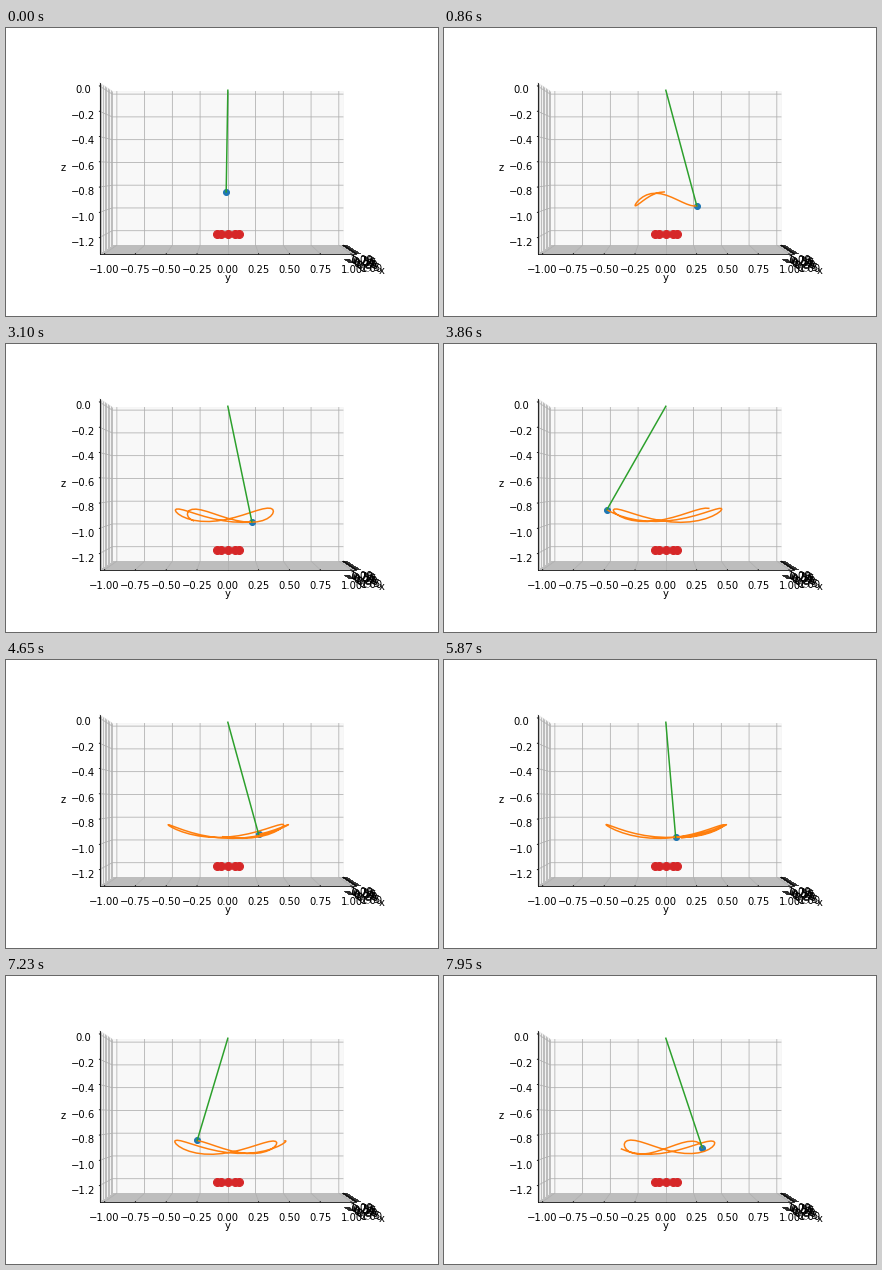
These frames come from a looping animation (432x288 px, 7.99 s). A matplotlib script:

```python
import numpy as np
import matplotlib.pyplot as plt
from matplotlib.animation import FuncAnimation

W, H, DPI = 432, 288, 72
LOOP, FRAMES = 7990, 243

# Swing: a slowly turning ellipse on a sphere of radius 1
MAJOR, MINOR = 0.52, 0.26
HALF_SWING = 16.92              # frames from one turning point to the next
START, TURN = np.radians([-1.6, 11.2])      # first angle, turn per half swing
TRAIL = 50


def position(frame):
    swings = frame / HALF_SWING
    tau = np.pi * swings
    turn = START + TURN * swings
    along, across = MAJOR * np.cos(tau), MINOR * np.sin(tau)
    x = -(along * np.cos(turn) + across * np.sin(turn))
    y = along * np.sin(turn) - across * np.cos(turn)
    return x, y, -np.sqrt(1 - x**2 - y**2)


def padded(low, high):
    pad = (high - low) / 48
    return low - pad, high + pad


plt.rcParams["font.family"] = "DejaVu Sans"
fig = plt.figure(figsize=(W / DPI, H / DPI), dpi=DPI)
ax = fig.add_axes((0, 0, 1, 1), projection="3d")
ax.apply_aspect = lambda position=None: None    # fill the whole figure
ax.set_box_aspect((1, 1, 1), zoom=np.sqrt(3) / 1.8294640721620434)
ax.view_init(elev=1e-6, azim=1e-6)      # level view that still picks its panes
ax.set_xlim(*padded(-1, 1))
ax.set_ylim(*padded(-1, 1))
ax.set_zlim(*padded(-1.3, 0))
ax.set_xlabel("x")
ax.set_ylabel("y")
ax.set_zlabel("z")

angles = 2 * np.pi * np.arange(5) / 5
ax.plot(0.1 * np.cos(angles), 0.1 * np.sin(angles), np.full(5, -1.2),
        "o", color="C3", markersize=8)
bob, = ax.plot([], [], [], "o", color="C0", markersize=6)
path, = ax.plot([], [], [], color="C1", linewidth=1.5)
rod, = ax.plot([], [], [], color="C2", linewidth=1.5)


def update(frame):
    x, y, z = position(frame)
    bob.set_data_3d([x], [y], [z])
    rod.set_data_3d([0, x], [0, y], [0, z])
    path.set_data_3d(*position(np.arange(max(0, frame - TRAIL), frame + 1)))
    return bob, path, rod


anim = FuncAnimation(fig, update, frames=FRAMES, interval=LOOP / FRAMES,
                     repeat=True, repeat_delay=0, blit=False)
plt.show()
```
